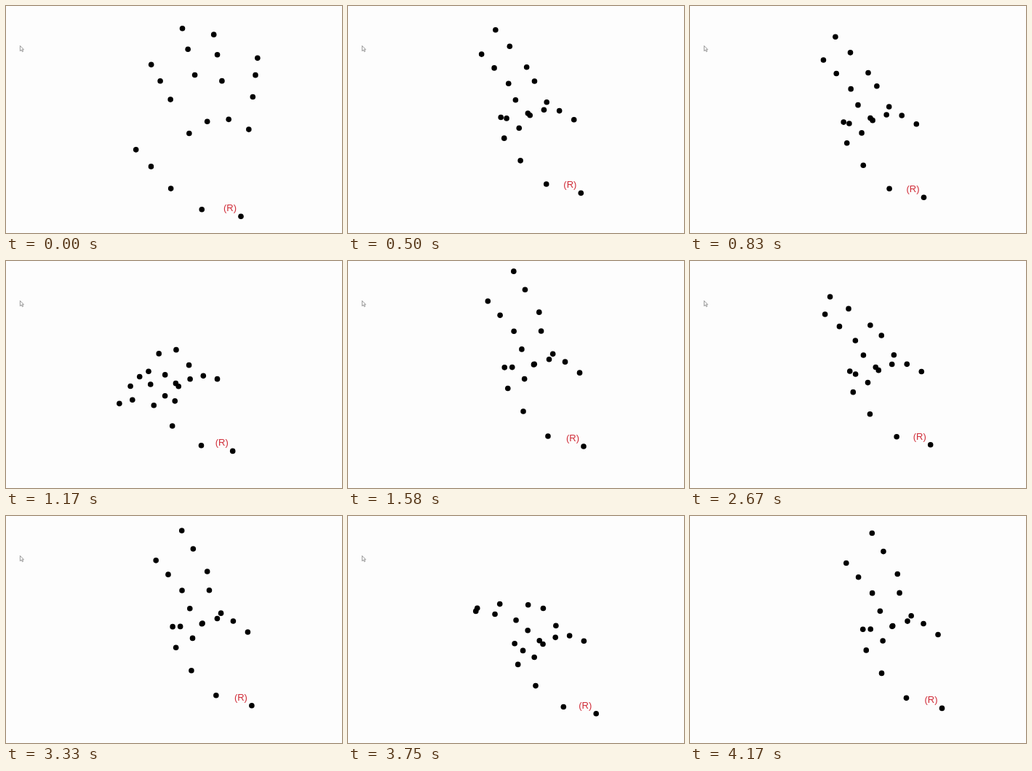
Write an HTML page that moves like this. It is 462 by 311 pixels and loops after 4250 ms.

```html
<!DOCTYPE html>
<html lang="en">
<head>
<meta charset="utf-8">
<title>Hand landmarks</title>
<style>
  html, body { margin: 0; width: 100%; height: 100%; overflow: hidden; background: #fdfdfd; }
  svg { display: block; width: 462px; height: 311px; }
  text { font: 13px "Liberation Sans", Arial, sans-serif; fill: #d02c38; }
</style>
</head>
<body>
<svg viewBox="0 0 462 311">
  <path id="cursor" d="M0 0V7.2L1.8 5.6L3 8.2L4.2 7.6L3 5.2H5Z" fill="#fff" stroke="#808080" stroke-width=".8"/>
  <g id="hand"><text x="-24" y="-7">(R)</text></g>
</svg>
<script>
const FRAMES = 51, LOOP = 4250, STEP = LOOP / FRAMES;

// Bone lengths run from wrist to tip; angles are degrees above the x axis.
// reach: how far the finger folds with the curl; lag: how late it starts.
const thumb = { bones: [51, 48, 38, 29], open: [164, 135, 124, 99], swing: [6, 11, 8, 0] };
const fingers = [
  { bones: [131.6, 53, 29, 25.6], open: [122, 131, 131], relaxed: 119, reach: 0.88, lag: 2 },
  { bones: [128.4, 66, 36.5, 29.5], open: [102, 122, 122], relaxed: 105, reach: 1.08, lag: 1 },
  { bones: [118.6, 53.5, 36.5, 28], open: [128, 223, 242], relaxed: 100, reach: 0.23, lag: 1 },
  { bones: [101, 45, 30, 23.5], open: [145, 209, 237], relaxed: 83, reach: 0.25, lag: 1 }
];
const FOLD = [36, 100, 121];

// Frame, wrist x, wrist y, curl.
const keys = [
  [0, 323, 288.3, 0], [4, 318, 262, 0.44], [6, 320.3, 256.3, 0.26], [8, 325, 262, 0],
  [14, 311.7, 260.4, 1], [16, 309, 258, 0.78], [19, 324, 254, 0], [25, 318.5, 258.3, 0.78],
  [28, 331, 245, 0], [32, 330.7, 251.8, 0.44], [36, 334, 276, 0.78], [40, 337.9, 259.8, 0],
  [46, 342, 272, 0.78], [50, 346.5, 263.4, 0]
];

const mix = (a, b, t) => a + (b - a) * t;

// Cubic Hermite curve through the keys.
function motionAt(frame) {
  const last = keys.length - 1;
  const n = Math.min(keys.findLastIndex(k => k[0] <= frame), last - 1);
  const a = keys[n], b = keys[n + 1];
  const before = keys[Math.max(n - 1, 0)], after = keys[Math.min(n + 2, last)];
  const span = b[0] - a[0], u = (frame - a[0]) / span;
  return [1, 2, 3].map(i => {
    const slopeA = (b[i] - before[i]) / (b[0] - before[0]) * span;
    const slopeB = (after[i] - a[i]) / (after[0] - a[0]) * span;
    return mix(a[i], b[i], u * u * (3 - 2 * u))
      + slopeA * u * (1 - u) ** 2 - slopeB * u * u * (1 - u);
  });
}

// Joint positions of a chain of [length, angle] bones that starts at the wrist.
function chain(bones) {
  let x = 0, y = 0;
  return bones.map(([length, angle]) => {
    const a = angle * Math.PI / 180;
    return [x += length * Math.cos(a), y -= length * Math.sin(a)];
  });
}

function thumbJoints(curl, relax) {
  const angles = thumb.open.map((angle, i) => angle + thumb.swing[i] * (curl + relax));
  angles[3] = mix(angles[3], angles[2], relax);
  return chain(thumb.bones.map((length, i) =>
    [length * (1 + 0.07 * relax - (i ? 0 : 0.14 * curl)), angles[i]]));
}

function fingerJoints({ bones, open, relaxed, reach, lag }, k, curl, relax) {
  const palm = [
    bones[0] * (1 + (0.02 + 0.055 * k) * relax - 0.12 * curl * (1 - k * k / 9)),
    mix(121 - 9.3 * k + 9 * curl, 122 - 12.4 * k, relax)
  ];
  const phalanges = open.map((angle, i) => {
    const bend = reach * curl ** (lag + (i ? 1 : 0));
    const stretch = 1 + bend * (i ? 0.12 : -0.15);
    return [bones[i + 1] * stretch, mix(angle + FOLD[i] * bend, relaxed, relax)];
  });
  return chain([palm, ...phalanges]);
}

const hand = document.getElementById("hand");
const cursor = document.getElementById("cursor");
const dots = Array.from({ length: 21 }, () => {
  const dot = document.createElementNS(hand.namespaceURI, "circle");
  dot.setAttribute("r", 3.8);
  return hand.appendChild(dot);
});

function draw() {
  const time = performance.now() % LOOP;
  const frame = Math.min(Math.floor((time + 3.4) / STEP), FRAMES - 1);
  const [x, y, bend] = motionAt(frame);
  const curl = Math.max(bend, 0);
  const relax = Math.max(1 - frame / 5, 0);
  const joints = [
    [0, 0],
    ...thumbJoints(curl, relax),
    ...fingers.flatMap((finger, k) => fingerJoints(finger, k, curl, relax))
  ];
  hand.setAttribute("transform", `translate(${x} ${y})`);
  dots.forEach((dot, i) => {
    dot.setAttribute("cx", joints[i][0]);
    dot.setAttribute("cy", joints[i][1]);
  });
  cursor.setAttribute("transform", `translate(${frame < 49 ? 19.4 : 45} 54.5)`);
  cursor.setAttribute("visibility", frame < 50 ? "visible" : "hidden");
  requestAnimationFrame(draw);
}
draw();
</script>
</body>
</html>
```
